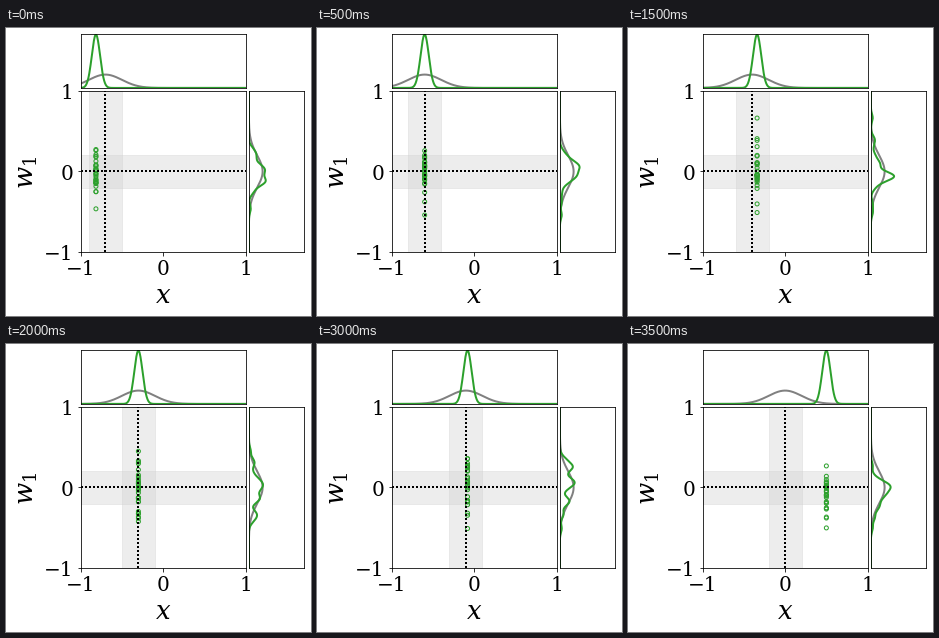
Animation, 305 px wide and 288 px high, one loop 6000 ms. Source, as a matplotlib script:

```python
import numpy as np
import matplotlib.pyplot as plt
from matplotlib.animation import FuncAnimation
from matplotlib.transforms import ScaledTranslation

W, H, DPI = 305, 288, 72
GREEN, GRAY = "C2", "gray"
WIDE, NARROW = 0.2, 0.05   # standard deviations of target and estimate
PDF_MAX = 8
SAMPLES = 30
TEXT_DROP = 0.8            # pixels the labels sit below their anchors

ESTIMATES = [-0.815, -0.6, -0.48, -0.34, -0.3, -0.265, -0.08, 0.5]
LAST = len(ESTIMATES) - 1

plt.rcParams.update({
    "font.family": "DejaVu Serif",
    "mathtext.fontset": "dejavuserif",
    "xtick.labelsize": 20,
    "ytick.labelsize": 20,
    "axes.labelsize": 26,
})


def gauss(x, mean, sd):
    return np.exp(-0.5 * ((x - mean) / sd) ** 2) / (sd * np.sqrt(2 * np.pi))


def density(y, points):
    return gauss(y[:, None], points[None, :], NARROW).mean(axis=1)


def panel(left, top, width, height):
    """Axes placed in pixels, measured from the top left."""
    return fig.add_axes([left / W, 1 - (top + height) / H, width / W, height / H])


# The small surplus keeps float rounding from losing a pixel
fig = plt.figure(figsize=((W + 1e-6) / DPI, (H + 1e-6) / DPI), dpi=DPI)
main = panel(74.68, 63.12, 164.9, 160.7)
top = panel(74.68, 6.38, 164.9, 53.55)
side = panel(242.9, 63.12, 55.0, 160.7)

main.set(xlim=(-1, 1), ylim=(-1, 1), xticks=[-1, 0, 1], yticks=[-1, 0, 1],
         xlabel="$x$", ylabel="$w_1$")
top.set(xlim=(-1, 1), ylim=(0, PDF_MAX), xticks=[], yticks=[])
side.set(xlim=(0, PDF_MAX), ylim=(-1, 1), xticks=[], yticks=[])

drop = ScaledTranslation(0, -TEXT_DROP / DPI, fig.dpi_scale_trans)
for label in main.get_xticklabels() + main.get_yticklabels():
    label.set_transform(label.get_transform() + drop)
main.yaxis.label.set_y(0.5 - TEXT_DROP / 160.7)

grid = np.linspace(-1, 1, 401)
shade = dict(color="lightgray", alpha=0.4)
dotted = dict(color="k", ls=(0, (1, 1)), lw=2)
band = main.axvspan(-WIDE, WIDE, **shade)
main.axhspan(-WIDE, WIDE, **shade)
mean_line = main.axvline(0, **dotted)
main.axhline(0, **dotted)
dots = main.scatter([], [], s=16, facecolors="none", edgecolors=GREEN, linewidths=1)

target, = top.plot([], [], color=GRAY, lw=2)
estimate, = top.plot([], [], color=GREEN, lw=2)
side.plot(gauss(grid, 0, WIDE), grid, color=GRAY, lw=2)
spread, = side.plot([], [], color=GREEN, lw=2)


def draw(frame):
    step = min(frame, LAST)
    mean = (step - LAST) / 10
    x = ESTIMATES[step]
    w1 = np.random.default_rng(step).normal(0, WIDE, SAMPLES)

    band.set_x(mean - WIDE)
    mean_line.set_xdata([mean, mean])
    dots.set_offsets(np.column_stack([np.full(SAMPLES, x), w1]))

    target.set_data(grid, gauss(grid, mean, WIDE))
    estimate.set_data(grid, gauss(grid, x, NARROW))
    spread.set_data(density(grid, w1), grid)
    return band, mean_line, dots, target, estimate, spread


anim = FuncAnimation(fig, draw, frames=12, interval=500, repeat=True, blit=False)
plt.show()
```
